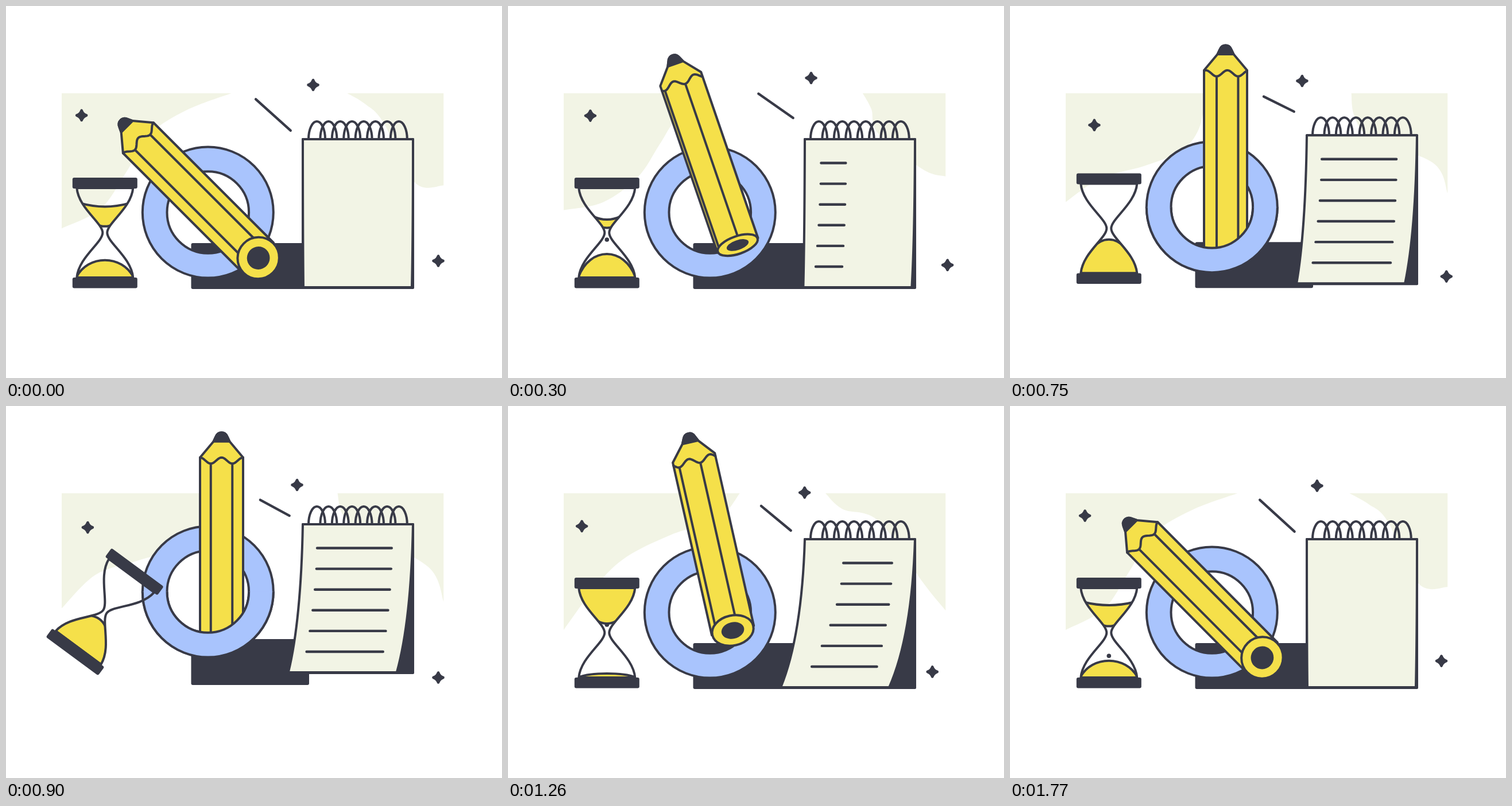
An HTML page with a canvas that plays this animation: 864x648 px, repeating every 1.8 s.

```html
<!DOCTYPE html>
<html lang="en">
<head>
<meta charset="utf-8">
<title>Stationery</title>
<style>
html, body { margin: 0; width: 100%; height: 100%; overflow: hidden; background: #fff; }
canvas { display: block; }
</style>
</head>
<body>
<canvas id="stage" width="864" height="648"></canvas>
<script>
const c = document.getElementById('stage').getContext('2d');
const LOOP = 1800, STEP = 30, TAU = Math.PI * 2, RAD = Math.PI / 180;
const DARK = '#383a47', YELLOW = '#f5e04a', BLUE = '#a9c4fd', PALE = '#f2f4e5';

// Timing helpers; times are in ms of the loop, phases in degrees.
const ramp = (t, a, b) => Math.min(1, Math.max(0, (t - a) / (b - a)));
const ease = (t, a, b) => (1 - Math.cos(Math.PI * ramp(t, a, b))) / 2;
const hop = (t, a, b) => Math.sin(Math.PI * ramp(t, a, b));
const sway = (t, mid, size, phase) => mid + size * Math.cos(TAU * t / LOOP - phase * RAD);

// Drawing helpers.
function paint(path, fill, line = 4) {
  if (fill) { c.fillStyle = fill; c.fill(path, 'evenodd'); }
  if (line) { c.lineWidth = line; c.stroke(path); }
}
function at(x, y, angle, draw) {
  c.save();
  c.translate(x, y);
  c.rotate(angle);
  draw();
  c.restore();
}
const segment = (x1, y1, x2, y2) => paint(new Path2D(`M${x1},${y1}L${x2},${y2}`), null, 4.4);
function box(x, y, w, h, r) {
  const p = new Path2D();
  p.roundRect(x, y, w, h, r);
  paint(p, DARK, 0);
}
function oval(x, y, rx, ry = rx) {
  const p = new Path2D();
  p.ellipse(x, y, rx, ry, 0, 0, TAU);
  return p;
}

// Swaying edge points: middle, size and phase for x, then for y.
const leftEdge = [
  [375, 40, 296, 152, 0, 0], [331, 36, 243, 197, 17, 157], [276, 25, 180, 235, 19, 128],
  [218, 17, 121, 280, 18, 57], [160, 6, 43, 324, 30, 6], [97, 0, 0, 370, 32, 303]];
const rightEdge = [
  [586, 33, 75, 152, 0, 0], [607, 27, 45, 181, 11, 155], [644, 15, 333, 213, 19, 122],
  [724, 13, 158, 294, 23, 305], [762.5, 0, 0, 327, 30, 241]];

// Smooth curve through the swaying points, closed at the upper corner.
function blob(t, edge) {
  const pts = edge.map(e => [sway(t, ...e.slice(0, 3)), sway(t, ...e.slice(3))]);
  const p = new Path2D(), n = pts.length - 1;
  p.moveTo(...pts[0]);
  for (let i = 0; i < n; i++) {
    const a = pts[Math.max(0, i - 1)], b = pts[i], d = pts[i + 1], e = pts[Math.min(n, i + 2)];
    p.bezierCurveTo(b[0] + (d[0] - a[0]) / 6, b[1] + (d[1] - a[1]) / 6,
      d[0] - (e[0] - b[0]) / 6, d[1] - (e[1] - b[1]) / 6, ...d);
  }
  p.lineTo(pts[n][0], 152);
  paint(p, PALE, 0);
}
function backdrop(t) {
  c.save();
  c.beginPath();
  c.rect(97, 152, 665.5, 300);
  c.clip();
  blob(t, leftEdge);
  blob(t, rightEdge);
  c.restore();
}

const star = new Path2D('M0,-8.5Q2.2,-2.2 8.5,0Q2.2,2.2 0,8.5Q-2.2,2.2 -8.5,0Q-2.2,-2.2 0,-8.5Z');
function sparkle(x, y, r, degrees) {
  const a = degrees * RAD;
  at(x + r * Math.cos(a), y + r * Math.sin(a), 0, () => paint(star, DARK, 4.6));
}

function notebook(t) {
  const d = -44 * ramp(t, 0, 1200) ** 1.8 * (1 - ease(t, 1200, 1780));
  at(0, -26 * hop(t, 720, 1080), 0, () => {
    for (let i = 0; i < 8; i++) {
      const p = new Path2D();
      p.ellipse(541.5 + 20.4 * i, 232, 14.5, 31, 0, Math.PI, TAU);
      paint(p);
    }
    box(515, 230, 196, 263, 2);
    paint(new Path2D(`M517,232H709Q${709 + d * .12},400 ${707 + d},490H${518 + d}Q${517 + d * .12},400 517,232Z`), PALE);
    // Each line is written from the left, then wiped from the left, upper lines first.
    for (let i = 0; i < 6; i++) {
      const u = (i / 5) ** 1.7, y = 273.5 + 36.1 * i;
      const left = 546 + .15 * d + u * (.4 * d - 8), width = 130.5 + .03 * d + u * (10.5 + .27 * d);
      const from = ease(t, 1000 + 150 * u, 1650), to = ease(t, 20, 740);
      if (to - from > .01) segment(left + width * from, y, left + width * to, y);
    }
  });
}

function ring(y) {
  const p = oval(351.8, y, 114);
  p.addPath(oval(351.8, y, 71.3));
  paint(p, BLUE);
}

function pencil(t) {
  const w = 37.5, lead = y => `M-14,${y - 28}L-10,${y - 36.5}C-6,${y - 46} 6,${y - 46} 10,${y - 36.5}L14,${y - 28}`;
  // The pencil stands up, waits, hops out of the ring and leans back.
  const lean = (up, down) => 1 - ease(t, 0, up) + ease(t, 960, down);
  const tilt = 45 * lean(545, LOOP), top = .38 * tilt - 313;
  const x = 375.5 + 1.2 * tilt + .005 * tilt * tilt;
  const y = 395 + 44 * lean(590, 1830) + 30 * hop(t, 570, 930) - 30 * hop(t, 930, 1330);
  const roll = w * (.5 - ramp(t, 0, 820) + ease(t, 900, 1440));
  const ry = 36 * (1 - ease(t, 0, 550) + ease(t, 1000, 1400));
  at(x, y, -tilt * RAD, () => {
    paint(new Path2D(`M${-w},0V${top}L-14,${top - 28}${lead(top).replace('M', 'L')}L${w},${top}V0Z`), YELLOW);
    paint(new Path2D(lead(top) + 'Z'), DARK);
    const wave = new Path2D();
    for (let s = -w; s <= w; s += 1.5)
      wave.lineTo(s, top + 5.3 * (1 + Math.cos(TAU * (s - roll) / w)));
    for (let s = roll - 2 * w; s < w; s += w) {
      if (s < -w) continue;
      wave.moveTo(s, top + 10.6);
      wave.lineTo(s, 0);
    }
    paint(wave);
    if (ry > .5) {
      paint(oval(0, 0, 36.5, ry), YELLOW);
      paint(oval(0, 0, 20, ry * .55), DARK, 0);
    }
  });
}

const glass = new Path2D('M-49,-78C-46,-43 -4,-17 -4,0C-4,17 -46,43 -49,78H49C46,43 4,17 4,0C4,-17 46,-43 49,-78Z');
const drops = [[1260, .17], [1350, .129], [100, .13]]; // start, speed
function heap(h) {
  const y = 78 - h / .75;
  paint(new Path2D(`M-50,78C-30,${y} 30,${y} 50,78Z`), YELLOW);
}
function hourglass(t) {
  const run = ramp((t + LOOP - 1260) % LOOP, 0, 1110);
  const flipping = t >= 570 && t < 1255;
  const h = 7 + 43 * run ** .85 + (flipping ? 12 * ease(t, 570, 850) : 0);
  const turn = flipping ? Math.PI * ease(t, 750, 1255) : 0;
  const level = -79 + 73 * run ** 1.35, half = 2 - .78 * level;
  at(172.3, 395 - 41 * hop(t, 720, 1230), turn, () => {
    c.save();
    c.clip(glass);
    heap(h);
    if (run < 1) {
      const surface = `M-60,${level}H${-half}Q0,${level + 12 * Math.min(1, 2 * run)} ${half},${level}H60`;
      c.save();
      c.clip(new Path2D(surface + 'V0H-60Z'));
      c.scale(1, -1);
      heap(62 + 10 * run);
      c.restore();
      paint(new Path2D(surface));
    }
    c.restore();
    for (const [start, speed] of drops) {
      const y = -14 + (t - start) * speed;
      if (t >= start && y < 78 - h) paint(oval(0, y, 3.8), DARK, 0);
    }
    paint(glass);
    box(-56.5, -96, 113, 19, 3);
    box(-56.5, 78, 113, 18.5, 3);
  });
}

function render(t) {
  c.fillStyle = '#fff';
  c.fillRect(0, 0, 864, 648);
  c.strokeStyle = DARK;
  c.lineCap = c.lineJoin = 'round';
  const turn = 360 * t / LOOP, ringY = 359.5 - 36 * hop(t, 720, 1080);
  backdrop(t);
  sparkle(137, 201, 11.8, turn - 117);
  sparkle(521, 137.5, 14, -turn);
  sparkle(753, 458.5, 14.5, turn - 90);
  segment(sway(t, 439, -4, 12), sway(t, 163, -11.5, 87), sway(t, 494.7, 2, 60), sway(t, 204, -22, 126));
  box(322.5, 413 - 7 * hop(t, 720, 1080), 205.5, 80, 3);
  ring(ringY);
  notebook(t);
  pencil(t);
  // While upright, the pencil stands inside the ring.
  if (t >= 570 && t < 1140) {
    c.save();
    c.beginPath();
    c.rect(200, ringY, 300, 140);
    c.clip();
    ring(ringY);
    c.restore();
  }
  hourglass(t);
}

const begin = performance.now();
function frame() {
  const t = (performance.now() - begin) % LOOP;
  render(Math.floor(t / STEP) * STEP);
  requestAnimationFrame(frame);
}
frame();
</script>
</body>
</html>
```
